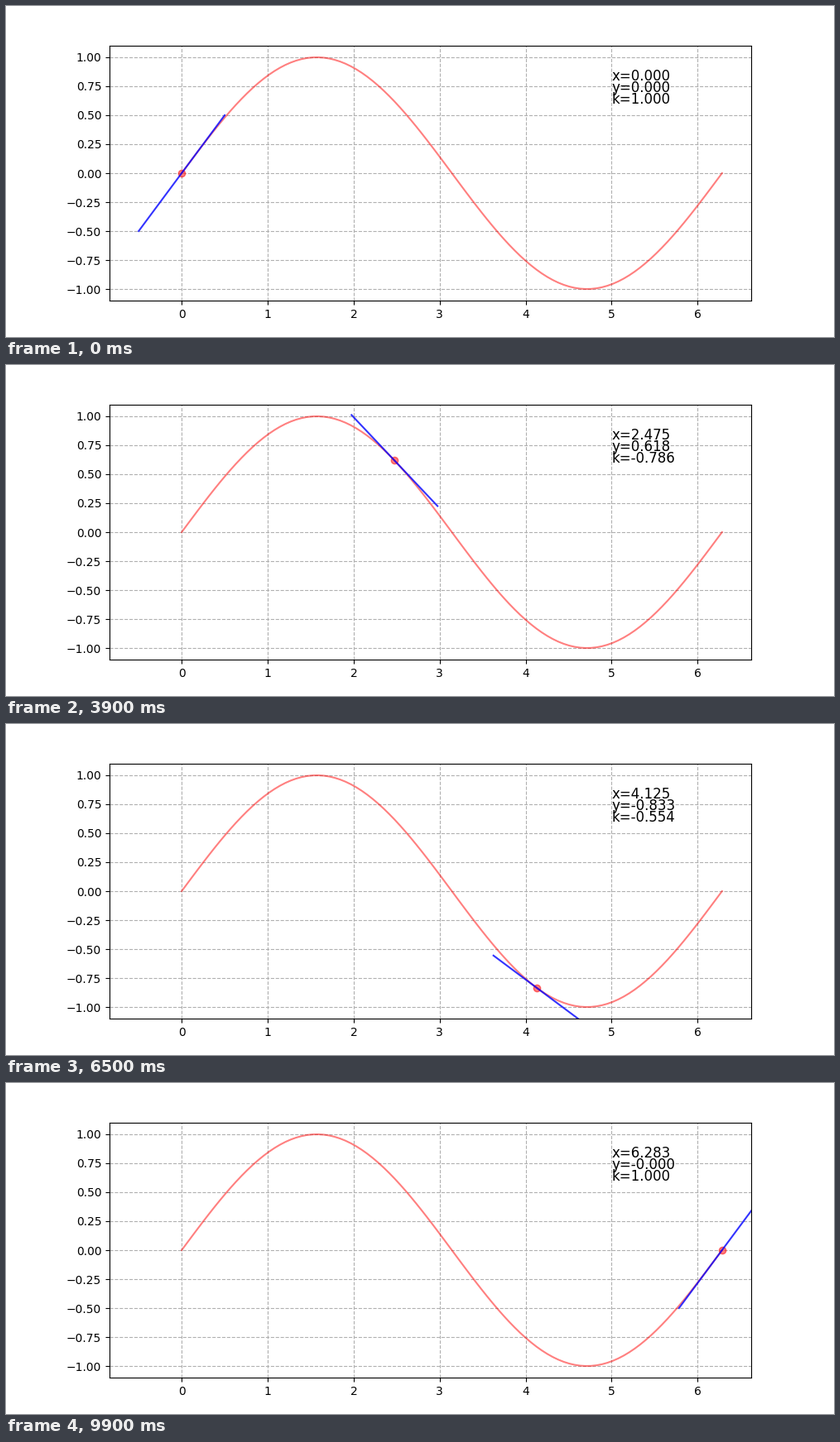
Write a matplotlib script that moves like this. It is 1000x400 px and loops after 10 s.

```python
import numpy as np
import matplotlib.pyplot as plt
from matplotlib.animation import FuncAnimation

STEPS = 100
HALF = 0.5  # half the tangent's width in x

xs = np.linspace(0, 2 * np.pi, STEPS)


def tangent(x0):
    x = np.array([x0 - HALF, x0 + HALF])
    return x, np.sin(x0) + np.cos(x0) * (x - x0)


fig, ax = plt.subplots(figsize=(10, 4), dpi=100)
ax.grid(linestyle="--")
ax.plot(xs, np.sin(xs), color="red", alpha=0.5)
dot, = ax.plot([0], [0], "ro", alpha=0.5)
line, = ax.plot(*tangent(0), color="blue", alpha=0.8)
labels = [ax.text(5, y, "", fontsize=12) for y in (0.8, 0.7, 0.6)]


def update(i):
    x = xs[i]
    y, k = np.sin(x), np.cos(x)
    dot.set_data([x], [y])
    line.set_data(*tangent(x))
    for label, name, value in zip(labels, "xyk", (x, y, k)):
        label.set_text(f"{name}={value:.3f}")
    return dot, line, *labels


anim = FuncAnimation(fig, update, frames=STEPS, interval=100,
                     repeat=True, repeat_delay=0, blit=False)
plt.show()
```
